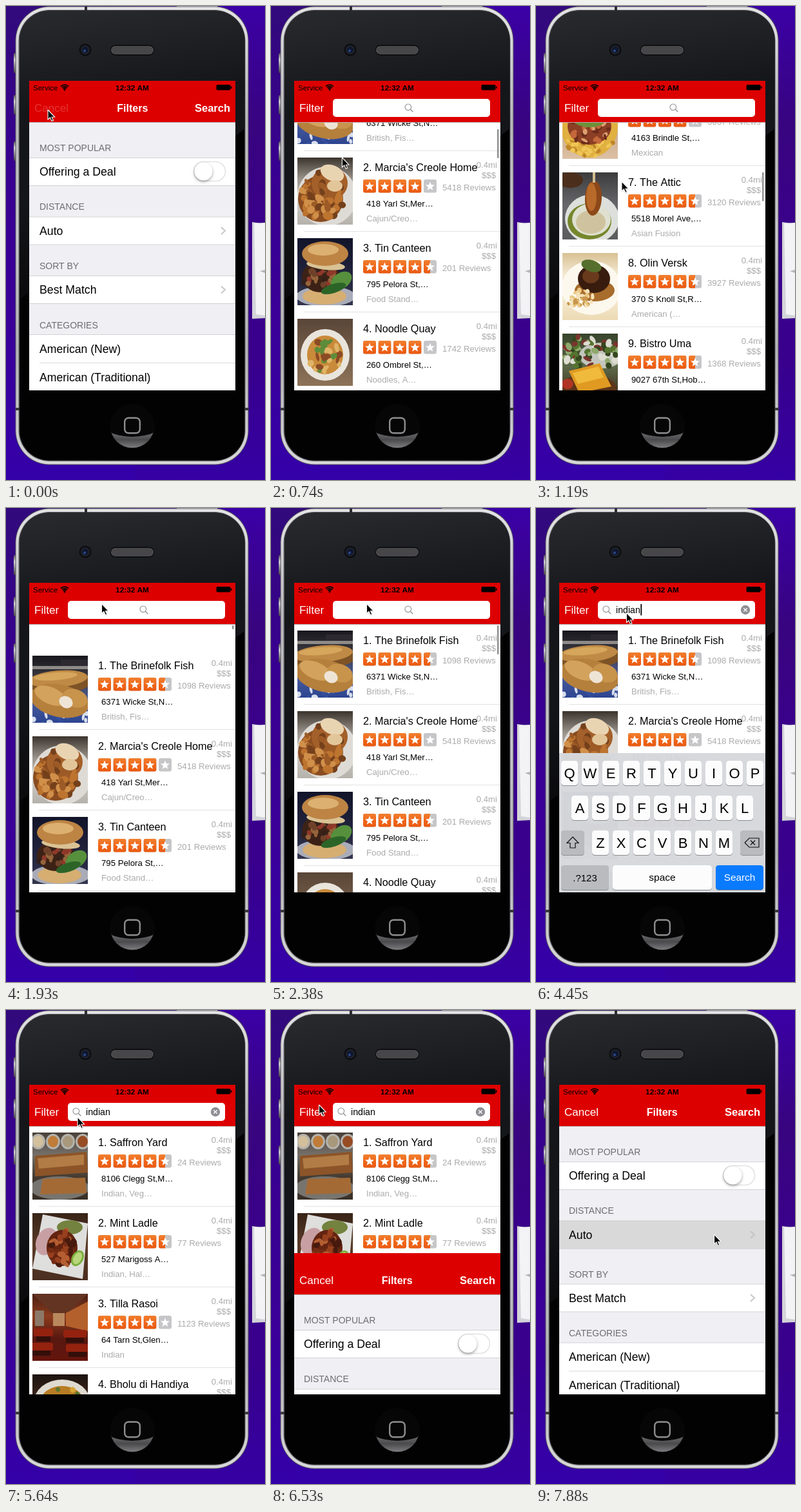
Write an HTML page with a canvas that moves like this. It is 402x735 px and loops after 8 s.

```html
<!DOCTYPE html>
<html lang="en">
<head>
<meta charset="utf-8">
<title>Restaurant finder</title>
<style>
html, body { margin: 0; width: 100%; height: 100%; overflow: hidden; background: #380090; }
canvas { display: block; }
</style>
</head>
<body>
<canvas id="stage" width="402" height="735"></canvas>
<script>
const g = document.getElementById('stage').getContext('2d');
const FONT = '"Liberation Sans", Arial, sans-serif';
const LOOP = 8000, TICK = 148.5;
const RED = '#dd0000', GREY = '#ababab', LINE = '#c8c7cc';

// ---------- helpers ----------
const clamp = v => Math.max(0, Math.min(1, v));
const smooth = p => { p = clamp(p); return p * p * (3 - 2 * p); };
const easeOut = p => 1 - (1 - clamp(p)) ** 3;

// keys: [time, value, ...], interpolated per component
function track(t, keys) {
  let i = 0;
  while (i < keys.length - 1 && t >= keys[i + 1][0]) i++;
  const a = keys[i], b = keys[i + 1] || a;
  const p = b === a ? 0 : clamp((t - a[0]) / (b[0] - a[0]));
  return a.slice(1).map((v, k) => v + (b[k + 1] - v) * p);
}

function rect(x, y, w, h, c) { g.fillStyle = c; g.fillRect(x, y, w, h); }

function round(x, y, w, h, r, c) {
  g.beginPath(); g.roundRect(x, y, w, h, r);
  g.fillStyle = c; g.fill();
}

function oval(c, x, y, rx, ry = rx, turn = 0) {
  g.beginPath(); g.ellipse(x, y, rx, ry, turn, 0, 7);
  g.fillStyle = c; g.fill();
}

function poly(c, ...pts) {
  g.beginPath();
  for (let i = 0; i < pts.length; i += 2) g.lineTo(pts[i], pts[i + 1]);
  g.closePath(); g.fillStyle = c; g.fill();
}

function stroke(c, w, ...pts) {
  g.beginPath();
  for (let i = 0; i < pts.length; i += 2) g.lineTo(pts[i], pts[i + 1]);
  g.strokeStyle = c; g.lineWidth = w; g.stroke();
}

function text(s, x, y, size, c = '#000', align = 'left', weight = '') {
  g.font = `${weight} ${size}px ${FONT}`;
  g.textAlign = align; g.fillStyle = c;
  g.fillText(s, x, y);
}

function fade(x0, y0, x1, y1, ...colors) {
  const f = g.createLinearGradient(x0, y0, x1, y1);
  colors.forEach((c, i) => f.addColorStop(i / (colors.length - 1), c));
  return f;
}

function clipped(x, y, w, h, draw) {
  g.save();
  g.beginPath(); g.rect(x, y, w, h); g.clip();
  draw();
  g.restore();
}

// seeded crumbs inside an ellipse
function crumbs(colors, n, x, y, rx, ry, size) {
  let s = n * 7919 + x;
  const rnd = () => (s = (s * 16807 + 11) % 2147483647) / 2147483647;
  rnd(); rnd();
  for (let i = 0; i < n; i++) {
    const a = rnd() * 6.283, r = Math.sqrt(rnd());
    oval(colors[i % colors.length], x + Math.cos(a) * rx * r, y + Math.sin(a) * ry * r,
      size * (0.6 + rnd() * 0.7), size * (0.4 + rnd() * 0.5), rnd() * 3);
  }
}

// ---------- photos, 86 x 104 ----------
const bg = (...c) => rect(0, 0, 86, 104, fade(0, 0, 0, 104, ...c));
const photos = {
  fish() {
    bg('#17171c', '#3c3a42', '#4a5c9c', '#2c4490');
    rect(44, 6, 42, 12, '#2c2a30');
    rect(0, 16, 86, 5, '#8d8a88');
    crumbs(['#d8deec', '#3550a0'], 30, 43, 90, 48, 18, 5);
    oval('#7d5326', 42, 42, 50, 17, -0.05);
    oval('#bf8a45', 40, 36, 46, 13, -0.08);
    oval('#d6a65c', 36, 32, 34, 6, -0.08);
    oval('#b57f3c', 42, 70, 46, 25, 0.22);
    oval('#d3a25c', 28, 62, 26, 13, 0.4);
    oval('#c8944c', 66, 66, 20, 14, 0.3);
    oval('#eee4d6', 52, 72, 11, 9, 0.5);
  },
  hash() {
    bg('#3b342d', '#9c968e', '#cbc7c2', '#b5b1ab');
    oval('#dedbd6', 46, 60, 46, 46);
    oval('#8a4c20', 36, 64, 35, 36);
    oval('#a4602a', 50, 40, 28, 26);
    crumbs(['#bd742f', '#74401c', '#d0904a', '#9c5a26'], 52, 40, 60, 34, 38, 7);
    oval('#e9d4b2', 54, 24, 19, 12, 0.4);
    oval('#e2c69a', 58, 44, 12, 9);
  },
  burger() {
    bg('#12142a', '#20223c', '#34364f');
    oval('#a9acb8', 44, 90, 46, 16);
    oval('#d6ae72', 42, 90, 34, 13);
    oval('#3c2216', 36, 60, 29, 24);
    crumbs(['#70422a', '#8f382a', '#34201a', '#94643c'], 22, 34, 60, 25, 18, 6);
    oval('#56903c', 68, 66, 18, 12, -0.6);
    oval('#2c6428', 56, 78, 20, 7, -0.3);
    oval('#d9c294', 44, 42, 30, 7, 0.1);
    oval('#bd8444', 43, 24, 36, 19);
    oval('#dcb070', 40, 18, 24, 9);
  },
  noodle() {
    bg('#5a4638', '#8d7358');
    oval('#e9e5dc', 43, 56, 38, 40);
    oval('#c98a3a', 43, 56, 28, 30);
    crumbs(['#e0b468', '#8b4b25', '#5e8c3a'], 30, 43, 56, 26, 26, 6);
  },
  taco() {
    bg('#a08a78', '#c8a888', '#dcc0a4');
    oval('#e0b040', 42, 54, 44, 48);
    crumbs(['#efc656', '#c08628'], 44, 42, 78, 38, 22, 4);
    oval('#8c3f24', 42, 54, 34, 28);
    crumbs(['#c4683c', '#6c2c1c', '#dca070'], 32, 42, 57, 31, 24, 5);
    oval('#6c9038', 42, 42, 26, 13);
  },
  drumstick() {
    bg('#3c3b3c', '#68686c', '#5c5c5e');
    oval('#4c2e1c', 12, 12, 20, 12);
    oval('#dcdfdb', 46, 72, 42, 38);
    oval('#75862c', 42, 76, 34, 28);
    oval('#dfe0d0', 45, 73, 30, 25);
    oval('#cfc39f', 44, 77, 23, 18);
    oval('#8c4818', 48, 40, 13, 27, 0.05);
    oval('#b86a2a', 45, 38, 8, 22);
    rect(47, 0, 4, 16, '#d2bd92');
  },
  roast() {
    bg('#d8c194', '#f4ead4', '#f6ead0', '#ecdab4');
    oval('#fcf8ee', 45, 54, 46, 42);
    oval('#a86c2c', 50, 58, 31, 17);
    oval('#381c0e', 49, 40, 25, 22);
    oval('#6a3a1c', 44, 36, 13, 11);
    oval('#566f2c', 45, 20, 16, 9, 0.3);
    crumbs(['#e9c884', '#c8964c', '#f4e2b8'], 38, 27, 70, 23, 14, 4);
  },
  cheese() {
    bg('#38442c', '#5c6848', '#382418');
    oval('#c2c6bc', 60, 34, 34, 20);
    crumbs(['#54742f', '#8fa86c', '#dcdcd0', '#7a342c', '#34461f'], 65, 45, 28, 44, 28, 6);
    oval('#5c3418', 40, 86, 44, 24);
    poly('#e09a22', 10, 58, 58, 46, 76, 82, 26, 92);
    poly('#f0ba3c', 16, 61, 56, 51, 64, 68, 24, 78);
    oval('#b03424', 8, 78, 9, 8);
  },
  tray() {
    bg('#4a4038', '#75706a', '#443a30', '#383028');
    ['#d2c09c', '#c07c38', '#a8987c', '#984c24'].forEach((c, i) => {
      oval('#b4b2ac', 9 + i * 23, 14, 11, 12);
      oval(c, 9 + i * 23, 14, 8, 9);
    });
    poly('#8c5428', 4, 36, 84, 30, 86, 62, 4, 68);
    poly('#b27c46', 8, 40, 80, 34, 80, 50, 10, 56);
    oval('#77746f', 42, 86, 46, 18);
    poly('#a46a36', 16, 72, 82, 70, 84, 94, 12, 96);
  },
  grill() {
    bg('#382418', '#5a3a26', '#4a2e20');
    poly('#dededc', 16, 2, 86, 16, 78, 102, 0, 86);
    oval('#c8a0a4', 22, 44, 16, 22, 0.4);
    oval('#74823f', 58, 22, 20, 11);
    oval('#642410', 46, 54, 24, 28);
    crumbs(['#98401e', '#481a0e', '#b45e32', '#742c14'], 36, 46, 54, 23, 28, 6);
    oval('#7cb040', 70, 70, 9, 13, 0.5);
    oval('#b8d67c', 70, 70, 6, 10, 0.5);
  },
  room() {
    bg('#4a1e12', '#8c3c1e', '#581810', '#64140c');
    poly('#643422', 0, 0, 86, 0, 56, 30, 30, 30);
    poly('#b4602c', 52, 30, 86, 12, 86, 58, 52, 50);
    rect(32, 30, 18, 20, '#b8885c');
    rect(4, 26, 14, 24, '#8c7868');
    [[2, 54, 30], [48, 56, 36], [-4, 76, 36], [52, 78, 36]].forEach(([x, y, w]) => {
      round(x, y, w, 12, 3, '#94220f');
      rect(x + 4, y + 12, w - 8, 8, '#340f0a');
    });
  },
  curry() {
    bg('#1c130f', '#4a2e20', '#6c452a');
    oval('#dedad0', 46, 44, 44, 36);
    oval('#b87c24', 46, 44, 34, 26);
    crumbs(['#d8a636', '#8c4c1a', '#5c782e'], 28, 46, 42, 32, 24, 5);
  }
};

// ---------- data: name, stars, reviews, address, cuisine, photo ----------
const nearby = [
  ['The Brinefolk Fish', 4.5, 1098, '6371 Wicke St,N…', 'British, Fis…', 'fish'],
  ["Marcia's Creole Home", 4, 5418, '418 Yarl St,Mer…', 'Cajun/Creo…', 'hash'],
  ['Tin Canteen', 4.5, 201, '795 Pelora St,…', 'Food Stand…', 'burger'],
  ['Noodle Quay', 4, 1742, '260 Ombrel St,…', 'Noodles, A…', 'noodle'],
  ['Fig & Barrow', 4.5, 866, '1904 Thessy St,…', 'Brunch, Ca…', 'roast'],
  ['Casa Pilun', 4, 3637, '4163 Brindle St,…', 'Mexican', 'taco'],
  ['The Attic', 4.5, 3120, '5518 Morel Ave,…', 'Asian Fusion', 'drumstick'],
  ['Olin Versk', 4.5, 3927, '370 S Knoll St,R…', 'American (…', 'roast'],
  ['Bistro Uma', 4.5, 1368, '9027 67th St,Hob…', 'French', 'cheese'],
  ['Plum Lantern', 4, 954, '77 Quillet St,…', 'Chinese', 'noodle']
];
const found = [
  ['Saffron Yard', 4.5, 24, '8106 Clegg St,M…', 'Indian, Veg…', 'tray'],
  ['Mint Ladle', 4.5, 77, '527 Marigoss A…', 'Indian, Hal…', 'grill'],
  ['Tilla Rasoi', 4, 1123, '64 Tarn St,Glen…', 'Indian', 'room'],
  ['Bholu di Handiya', 4, 412, '315 Velm St,Ten…', 'Indian', 'curry']
];

// ---------- phone ----------
function drawPhone() {
  rect(0, 0, 200, 735, fade(0, 0, 0, 735, '#320a7c', '#380090', '#3a0098', '#3400a8'));
  rect(200, 0, 202, 735, fade(0, 0, 0, 735, '#3b00a6', '#38047f', '#3a008c', '#38008c', '#3500a4'));
  rect(265, 0, 63, 1, '#e6e4ee');
  poly('#d3d3d8', 382, 335, 402, 338, 402, 484, 382, 485);
  poly('#f3f3f5', 385, 337, 402, 336, 402, 480, 388, 478);
  poly('#b5b5bb', 394, 411, 402, 409, 402, 414);

  [[73, 31], [138, 30], [210, 30]].forEach(([y, h]) =>
    round(12, y, 6, h, 2, fade(0, y, 0, y + h, '#555', '#d5d5d8', '#88888c', '#444')));
  round(14.5, 0.5, 362, 711, 53, '#5c5c60');
  round(15.5, 1.5, 360, 709, 52, fade(0, 1, 0, 711, '#e4e4e6', '#b9b9bc', '#c9c9cc', '#b4b4b8', '#d8d8da'));
  round(19.5, 6, 352, 700, 48, '#58585c');
  rect(122, 1, 4, 6, '#2c2c30');
  rect(15, 623, 6, 4, '#38383c');
  rect(371, 623, 6, 4, '#38383c');
  round(21, 7.5, 349.5, 697, 46, '#020203');
  g.save();
  g.beginPath(); g.roundRect(21, 7.5, 349.5, 697, 46); g.clip();
  poly(fade(100, 8, 160, 440, '#28292d', '#15161a', '#141518', '#0a0a0c'), 21, 7, 371, 7, 371, 190, 21, 455);
  g.restore();

  oval('#0c0d10', 123, 68, 9.5);
  oval('#22252d', 123, 68, 7);
  oval('#0f1730', 123, 68, 5);
  oval('#2d4a8c', 122, 69.5, 2);

  round(162, 60.5, 68, 16, 8, '#060607');
  round(163, 62, 66, 13, 6.5, '#57575a');
  g.save();
  g.beginPath(); g.roundRect(164, 63, 64, 11, 5.5); g.clip();
  for (let y = 0; y < 6; y++)
    for (let x = 0; x < 33; x++) rect(164 + x * 2 + (y % 2), 63 + y * 2, 1, 1, '#161618');
  g.restore();

  oval(fade(0, 630, 0, 686, '#020203', '#0e0e0f', '#38383a'), 196, 651, 34.5);
  g.save();
  g.beginPath(); g.arc(196, 651, 34, 0, 7); g.clip();
  rect(160, 660, 72, 27, fade(0, 660, 0, 685, '#6f6f71', '#4a4a4c', '#7c7c7e'));
  oval('#060607', 196, 640, 52, 28);
  g.restore();
  g.beginPath(); g.roundRect(184.2, 638.7, 23.6, 23.6, 6);
  g.strokeStyle = '#8d8d90'; g.lineWidth = 2.4; g.stroke();
}

function drawStatus() {
  text('Service', 42, 130.5, 11.5);
  text('12:32 AM', 196, 130.5, 11.8, '#000', 'center', 'bold');
  g.strokeStyle = '#000'; g.lineWidth = 1.7;
  [3.6, 6.2, 8.8].forEach(r => {
    g.beginPath(); g.arc(91, 131, r, -2.33, -0.81); g.stroke();
  });
  oval('#000', 91, 130, 1.4);
  round(326.5, 122, 22, 8.5, 2, '#000');
  rect(349, 124.5, 1.5, 3.5, '#000');
}

// the red bar with the hairline under it
function drawBar() {
  rect(36, 116, 320, 64, RED);
  rect(36, 180, 320, 1, '#b9adad');
}

// ---------- restaurant list ----------
function drawStars(x, y, n) {
  for (let i = 0; i < 5; i++) {
    const left = x + i * 23.5, full = clamp(n - i);
    round(left, y, 20, 20.5, 3, '#c6c6c8');
    if (full) clipped(left, y, 20 * full, 21, () =>
      round(left, y, 20, 20.5, 3, fade(0, y, 0, y + 20, '#f08030', '#f0671a', '#ea5a10')));
    const pts = [];
    for (let k = 0; k < 10; k++) {
      const a = k * Math.PI / 5 - Math.PI / 2, r = k % 2 ? 3.2 : 7.4;
      pts.push(left + 10 + Math.cos(a) * r, y + 10.8 + Math.sin(a) * r);
    }
    poly('#fff', ...pts);
  }
}

function drawRow([name, stars, reviews, address, cuisine, photo], i, y) {
  g.save();
  g.translate(41, y + 10);
  clipped(0, 0, 86, 104, photos[photo]);
  g.restore();
  text('0.4mi', 351, y + 26, 13.2, GREY, 'right');
  text('$$$', 349, y + 42, 13.2, GREY, 'right');
  text(`${i + 1}. ${name}`, 143, y + 31, 16.2);
  drawStars(143, y + 44, stars);
  text(`${reviews} Reviews`, 266, y + 61, 13.2, GREY);
  text(address, 148, y + 86, 13.2);
  text(cuisine, 148, y + 109, 13.2, GREY);
  rect(51, y + 124, 305, 1, '#e2e2e4');
}

function drawList(T) {
  const rows = T < 35 ? nearby : found;
  const [scroll] = track(T, [[4.5, 0], [6, 240], [8, 682], [9, 760], [10, 640], [12, 30], [13, -39], [14, -16], [15, -4], [16, 0]]);
  rect(36, 180, 320, 416, '#fff');
  clipped(36, 180, 320, 416, () => {
    rows.forEach((row, i) => {
      const y = 180 + i * 125 - scroll;
      if (y > 50 && y < 600) drawRow(row, i, y);
    });
    if (T > 4.5 && T < 17) {
      const len = Math.max(6, 45 + Math.min(0, scroll));
      round(351, 182 + Math.max(0, scroll) * 0.111, 2.5, len, 1.2, 'rgba(110,110,110,.75)');
    }
  });
}

function drawSearchBar(T) {
  drawBar();
  text('Filter', 44, 164, 17.2, T === 42 ? 'rgba(255,255,255,.25)' : '#fff');
  round(96, 144, 244, 28, 5, '#fff');

  const x = 214 - 104 * smooth((T - 18.2) / 2);
  g.beginPath(); g.arc(x - 1.2, 156.8, 4.8, 0, 7);
  g.strokeStyle = '#8e8e93'; g.lineWidth = 1.1; g.stroke();
  stroke('#8e8e93', 1.3, x + 2.3, 160.3, x + 6.3, 164.3);

  const count = T < 25 ? 0 : T < 27 ? 1 : T < 28 ? 2 : T < 29 ? 3 : T < 30 ? 5 : 6;
  const query = 'indian'.slice(0, count);
  text(query, 124, 162.5, 14.2);
  if (T >= 20 && T < 32) rect(123 + g.measureText(query).width + (count ? 1.5 : 0), 149, 1.8, 17.5, '#000');
  if (count) {
    oval('#8e8e93', 325, 158, 7.2);
    stroke('#fff', 1.3, 322.2, 155.2, 327.8, 160.8);
    stroke('#fff', 1.3, 327.8, 155.2, 322.2, 160.8);
  }
}

// ---------- keyboard ----------
function key(x, y, w, c) {
  round(x, y + 1, w, 38, 4.5, '#8b8d91');
  round(x, y, w, 38, 4.5, c);
}

function drawKeyboard(T) {
  const hidden = T < 32 ? 1 - easeOut((T - 18.4) / 4.05) : smooth((T - 31.3) / 2.8);
  if (hidden >= 1) return;
  const top = 380 + 216 * hidden, typed = T >= 25;
  const dim = '#b9bbbf';
  rect(36, top, 320, 216, 'rgba(215,217,221,.975)');
  ['QWERTYUIOP', 'ASDFGHJKL', 'ZXCVBNM'].forEach((line, r) => {
    const x0 = [39, 55, 87][r], y = top + 12 + r * 54;
    [...line].forEach((ch, i) => {
      key(x0 + i * 32, y, 26, '#fcfcfd');
      text(ch, x0 + i * 32 + 13, y + 27, 22, '#000', 'center');
    });
  });

  const y = top + 120;
  key(39, y, 36, dim);
  g.beginPath();
  [[57, 10], [66, 19.5], [61, 19.5], [61, 27], [53, 27], [53, 19.5], [48, 19.5]].forEach(p => g.lineTo(p[0], y + p[1]));
  g.closePath();
  if (typed) { g.strokeStyle = '#111'; g.lineWidth = 1.2; g.stroke(); }
  else { g.fillStyle = '#797b80'; g.fill(); }

  key(317, y, 36, dim);
  stroke('#111', 1.2, 324, y + 19, 331, y + 12, 346, y + 12, 346, y + 26, 331, y + 26, 324, y + 19);
  stroke('#111', 1.2, 333, y + 15.5, 340, y + 22.5);
  stroke('#111', 1.2, 340, y + 15.5, 333, y + 22.5);

  const b = top + 174;
  key(39, b, 74, dim);
  text('.?123', 76, b + 24.5, 15, '#000', 'center');
  key(119, b, 154, '#fcfcfd');
  text('space', 196, b + 24, 15.5, '#000', 'center');
  key(279, b, 74, typed ? '#0a7bff' : dim);
  text('Search', 316, b + 24, 15.3, typed ? '#fff' : '#85878b', 'center');
}

// ---------- filters sheet ----------
function cell(label, y, dx, fill = '#fff') {
  rect(36, y, 320, 44, fill);
  rect(36, y, 320, 1, '#d2d2d6');
  rect(36, y + 43, 320, 1, '#d2d2d6');
  text(label, 52 + dx, y + 28, 17.7);
}

function chevron(y, dx, c = LINE) {
  stroke(c, 2, 334 + dx, y - 5.5, 340 + dx, y, 334 + dx, y + 5.5);
}

function drawFilters(T) {
  const drop = T < 30 ? smooth((T - 0.5) / 3.2) : 1 - smooth((T - 42.4) / 3.4);
  if (drop >= 1) return;
  const second = T > 30, open = T >= 53;
  const dx = second ? -1 : 0, push = open ? 6.5 : 0;
  const head = (s, y) => text(s, 52 + dx, y, 14, '#6d6d72');
  g.save();
  g.translate(0, Math.round(480 * drop));
  rect(36, 180, 320, 416, '#efeff4');
  drawBar();
  text('Cancel', 44, 164, 17, second ? '#fff' : 'rgba(255,255,255,.2)');
  text('Filters', 196.3 + dx * 0.6, 164, 16, '#fff', 'center', 'bold');
  text('Search', 348, 164, 16.5, '#fff', 'right', 'bold');

  head('MOST POPULAR', 225);
  cell('Offering a Deal', 235, dx);
  g.beginPath(); g.roundRect(291.5 + dx, 241.5, 49, 30, 15);
  g.fillStyle = '#fff'; g.fill();
  g.strokeStyle = '#e2e2e4'; g.lineWidth = 1.5; g.stroke();
  g.save();
  g.shadowColor = 'rgba(0,0,0,.35)'; g.shadowBlur = 4; g.shadowOffsetY = 2;
  oval('#fff', 306.5 + dx, 256.5, 14);
  g.restore();

  head('DISTANCE', 316);
  cell('Auto', 326.5, dx, open ? '#d9d9d9' : '#fff');
  chevron(348.5, dx, open ? '#c4c4c8' : LINE);

  head('SORT BY', 408 + push);
  cell('Best Match', 418 + push, dx);
  chevron(440 + push, dx);

  head('CATEGORIES', 499.5 + push);
  rect(36, 509 + push, 320, 90, '#fff');
  rect(36, 509 + push, 320, 1, '#d2d2d6');
  text('American (New)', 52 + dx, 537.5 + push, 17.6);
  rect(52 + dx, 553 + push, 304, 1, '#d9d9dc');
  text('American (Traditional)', 52 + dx, 581.5 + push, 17.6);
  g.restore();
}

function drawPointer(T) {
  const [x, y] = track(T, [[3, 65, 161], [6, 133, 272], [9, 133, 272], [12, 148.5, 148.5], [16, 148.5, 148.5],
    [18, 140.5, 162.5], [36, 140.5, 162.5], [38, 111, 166], [39, 76, 147], [40, 74.5, 147], [44, 74.5, 147], [49, 276.5, 348]]);
  g.save();
  g.translate(x, y);
  g.shadowColor = 'rgba(0,0,0,.3)'; g.shadowBlur = 2; g.shadowOffsetY = 1;
  const arrow = [0, 0, 0, 15, 3.4, 12, 6, 17.5, 8.4, 16.5, 6, 11.2, 10.6, 11];
  poly('#000', ...arrow);
  g.shadowColor = 'transparent';
  stroke('#fff', 1.1, ...arrow, 0, 0);
  g.restore();
}

function draw(T) {
  drawPhone();
  clipped(36, 116, 320, 480, () => {
    drawList(T);
    drawSearchBar(T);
    drawKeyboard(T);
    drawFilters(T);
    drawStatus();
  });
  drawPointer(T);
}

let last = -1;
function frame(now) {
  const T = Math.floor((now % LOOP + 6) / TICK);
  if (T !== last) draw(last = T);
  requestAnimationFrame(frame);
}
draw(0);
requestAnimationFrame(frame);
</script>
</body>
</html>
```
